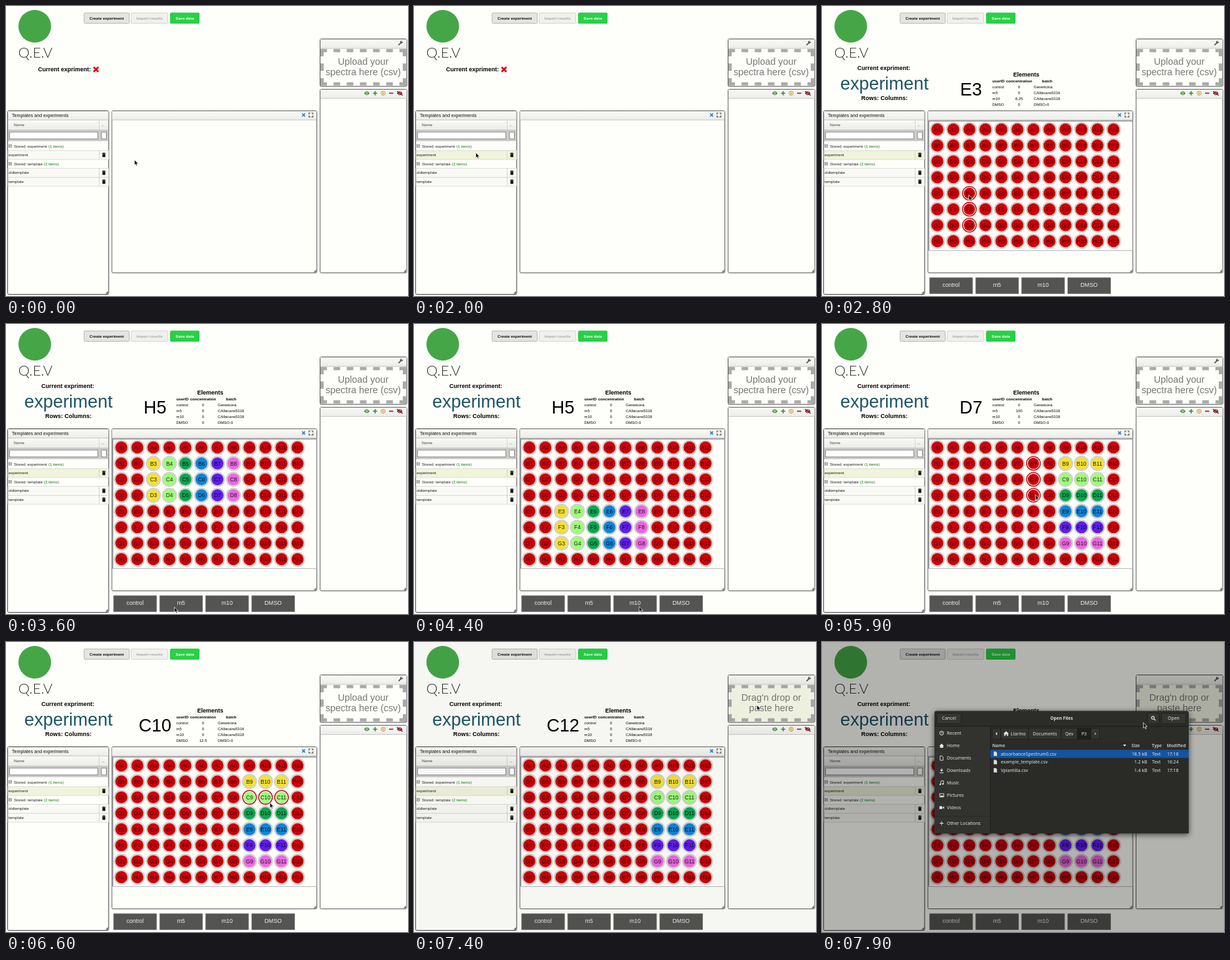
An HTML page that plays this animation: 615 px wide and 444 px high, repeating every 8000 ms.

```html
<!DOCTYPE html>
<html lang="en">
<head>
<meta charset="utf-8">
<title>Plate editor</title>
<style>
html, body { margin: 0; width: 100%; height: 100%; overflow: hidden; background: #fefefa; }
svg { display: block; width: 615px; height: 444px; font-family: "Liberation Sans", Arial, sans-serif; }
#dialog { font-family: "Noto Sans", sans-serif; filter: drop-shadow(0 2px 4px #000a); }
</style>
</head>
<body>
<svg id="stage" viewBox="0 0 615 444"></svg>
<script>
const LOOP = 8000, LOAD = 2300;
const RED = '#cc0008';
const LEVELS = ['#f5e132', '#9dff78', '#0aa650', '#0f84d8', '#5f1eec', '#ec66e2'];
const ELEMENTS = [['control', 'Geneticina'], ['m5', 'CAlbicans5316'], ['m10', 'CAlbicans5318'], ['DMSO', 'DMSO-0']];
const CLICKS = [[3400, 1], [4200, 2], [4800, 3]];
// Pointer path: time, x, y
const PATH = [
  [0, 197, 236], [1000, 197, 236], [1700, 95, 225], [2400, 95, 225], [2800, 225, 290],
  [3100, 274, 360], [3400, 258, 434], [3700, 258, 434], [4100, 334, 433], [4300, 334, 433],
  [4700, 403, 433], [5100, 403, 433], [5400, 378, 330], [5800, 327, 262], [6300, 327, 262],
  [6800, 446, 238], [6900, 470, 225], [7300, 525, 97], [7500, 525, 97], [7900, 492, 124]
];

const $ = id => document.getElementById(id);
const range = n => [...Array(n).keys()];
const clamp = v => Math.max(0, Math.min(1, v));
const show = (id, on) => $(id).setAttribute('display', on ? 'inline' : 'none');

const rect = (x, y, w, h, fill, more = '') =>
  `<rect x="${x}" y="${y}" width="${w}" height="${h}" fill="${fill}" ${more}/>`;
const text = (x, y, size, str, fill = '#222', more = '') =>
  `<text x="${x}" y="${y}" font-size="${size}" fill="${fill}" ${more}>${str}</text>`;
const path = (d, stroke, width = 1, fill = 'none', more = '') =>
  `<path d="${d}" stroke="${stroke}" stroke-width="${width}" fill="${fill}" ${more}/>`;
const circle = (x, y, r, fill, more = '') => `<circle cx="${x}" cy="${y}" r="${r}" fill="${fill}" ${more}/>`;
const group = (id, body, more = '') => `<g id="${id}" ${more}>${body}</g>`;
const BOLD = 'font-weight="bold"', MID = 'text-anchor="middle"', END = 'text-anchor="end"';

const wellX = c => 176.5 + 24.5 * c;
const wellY = r => 189 + 24.43 * r;
const wellName = (r, c) => 'ABCDEFGH'[r] + (c + 1);

// Returns the element and concentration level of a well, if it has any
function content(r, c) {
  if (c > 1 && c < 8 && r > 0 && r < 7) return { element: r < 4 ? 1 : 2, level: c - 2 };
  if (c > 7 && c < 11 && r > 0 && r < 7) return { element: 3, level: r - 1 };
  return null;
}

function panel(x, y, w, h, head, stroke = '#666') {
  const r = x + w, b = y + h;
  return rect(x + .3, y + .3, w, h, 'none', 'rx="2" stroke="#0001" stroke-width="2.4"') +
    rect(x, y, w, h, '#fefefa', `rx="2" stroke="${stroke}"`) +
    rect(x + .5, y + .5, w - 1, head - .5, 'url(#head)') +
    path(`M${x} ${y + head}H${r}`, '#bbb', .8) +
    path(`M${r - 1} ${b - 5}V${b - 1}H${r - 5}Z`, 'none', 0, '#666');
}

function eye(x, y, color) {
  return path(`M${x - 4} ${y}Q${x} ${y - 5} ${x + 4} ${y}Q${x} ${y + 5} ${x - 4} ${y}Z`, color, .6, color) +
    circle(x, y, 1.7, '#f4f4f0') + circle(x, y, .9, color);
}

function trash(y) {
  return path(`M147 ${y - 2.4}h5.4M148.6 ${y - 3}h2.2`, '#000', 1) + rect(147.5, y - 1.6, 4.4, 4.8, '#000', 'rx=".6"');
}

function topBar() {
  const button = (x, w, label, fill, edge, color) => rect(x, 10.7, w, 15.8, fill, `rx="1" stroke="${edge}"`) +
    text(x + w / 2, 21, 6, label, color, BOLD + MID);
  return circle(44, 31, 25, '#45a647') +
    text(45, 79, 22, 'Q.E.V', '#333', MID + ' font-family="Lato, sans-serif" font-weight="300"') +
    button(119.5, 69, 'Create experiment', '#e4e4e0', '#b8b8b4', '#111') +
    button(191.5, 56, 'Import results', '#f0f0ec', '#d4d4d0', '#aaa') +
    button(251.5, 44, 'Save data', '#28d146', '#28c844', '#fff');
}

function listPanel() {
  const row = (y, label) => rect(3, y, 154, 13.7, '#f9f9f5', `stroke="#d0d0cc" stroke-width=".7" id="row-${label}"`) +
    path(`M142.5 ${y}v13.7`, '#ccc', .8) + text(4, y + 8.8, 6, label) + trash(y + 6.8);
  const heading = (y, label, n) => rect(4.5, y - 4.5, 4, 4, '#fff', 'stroke="#777" stroke-width=".8"') +
    path(`M5.3 ${y - 2.5}h2.4`, '#333', .8) + text(12, y, 6, 'Stored: ' + label) +
    text(label === 'template' ? 58 : 65, y, 6, `(${n} items)`, '#088008');
  return panel(2.5, 160.5, 154.5, 281, 14, '#444') +
    text(9, 170, 7.1, 'Templates and experiments', '#111') +
    rect(3, 175, 154, 13.5, 'url(#head)') + text(12, 183.5, 6, 'Name', '#444') + text(145.5, 183.5, 6, '...', '#444') +
    path('M142.5 175v14', '#ccc', .8) +
    rect(3, 189, 154, 18, '#ccccc8') +
    rect(5.5, 193, 135, 10.5, '#fff', 'stroke="#888"') + rect(146, 193, 7.5, 10.5, '#fff', 'stroke="#888"') +
    path('M156.5 175V276', '#aaa', .8) +
    heading(216.7, 'experiment', 1) + row(221.3, 'experiment') +
    heading(244, 'template', 2) + row(248.6, 'oldtemplate') + row(262.3, 'template');
}

function uploadPanel() {
  const side = (d, dash) => path(d, '#aaaaa8', 5, 'none', `stroke-dasharray="${dash}"`);
  const lines = (a, b) => [a, b].map((s, i) => text(546.5, 89.8 + 16 * i, 14.4, s, '#777', MID)).join('');
  return panel(480.5, 50.5, 132.5, 72.5, 14.5, '#555') +
    path('M600.5 59.8L604.6 55.8', '#555', 1.8) + circle(605, 55.2, 2.1, '#555') + path('M605 55L608 52', '#f4f4f0', 1.4) +
    rect(481, 66, 131, 56, '#fefefa', 'id="drop"') +
    side('M481 68.2H612M481 119.2H612', 131 / 13) + side('M483.5 65.7V121.7M609.5 65.7V121.7', 11.2) +
    group('askUpload', lines('Upload your', 'spectra here (csv)')) +
    group('askDrop', lines("Drag'n drop or", 'paste here'));
}

function sidePanels() {
  return panel(162, 160.5, 313.5, 248, 14) +
    path('M453 164.5l4.6 4.6m0-4.6l-4.6 4.6', '#2f7ec4', 1.6) +
    path('M463.5 166v-2.3h2.2m1.6 0h2.2v2.3m0 1.6v2.3h-2.2m-1.6 0h-2.2v-2.3', '#555', 1.1) +
    panel(480.5, 127.5, 132.5, 281, 14) +
    eye(552, 133.5, '#3a8a2c') + path('M561.5 133.5h6.4m-3.2-3.2v6.4', '#3a8a2c', 1.7) +
    circle(577, 133.5, 3.2, 'none', 'stroke="#c9a227" stroke-width="1"') +
    circle(577, 133.5, 1.3, 'none', 'stroke="#c9a227" stroke-width="1"') +
    path('M586 133.5h6.5', '#a01020', 1.6) +
    eye(602.3, 133.5, '#7d0a18') + path('M598 130.2l8.8 6.8', '#7d0a18', 1.2);
}

function experimentView() {
  const info = text(94.5, 98.3, 9, 'Current expriment:', '#000', BOLD + MID) +
    text(95.5, 128, 27.3, 'experiment', '#1d5563', MID) +
    text(95.5, 144.3, 9, 'Rows: Columns:', '#000', BOLD + MID) +
    text(228, 136.5, 27.3, '', '#000', MID + ' id="label"') +
    text(312.5, 108, 9, 'Elements', '#000', BOLD + MID) +
    [[270, 'userID'], [301.5, 'concentration'], [344.5, 'batch']]
      .map(([x, s]) => text(x, 117.3, 6, s, '#000', BOLD + MID)).join('') +
    ELEMENTS.map(([name, batch], i) => {
      const y = 126.3 + 9 * i;
      return text(260.5, y, 6, name, '#000') + text(301.5, y, 6, '0', '#000', `${MID} id="conc${i}"`) +
        text(324, y, 6, batch, '#000');
    }).join('');
  const wells = range(96).map(i => {
    const r = i / 12 | 0, c = i % 12, x = wellX(c), y = wellY(r);
    return circle(x, y, 11.6, '#d2d2ce') +
      circle(x, y, 10.4, '#fff', `stroke="${RED}" stroke-width="1.3" id="ring${i}"`) +
      circle(x, y, 9.2, RED, `id="well${i}"`) +
      text(x, y + 3.2, 8.4, wellName(r, c), '#000', `${MID} id="name${i}"`);
  }).join('');
  const buttons = ELEMENTS.map(([name], i) => {
    const x = 164.8 + 70.4 * i;
    return rect(x, 416, 65.4, 24.3, '#545452', 'stroke="#6a6a68" stroke-width=".8"') +
      text(x + 32.7, 430, 8.8, name, '#eee', MID);
  }).join('');
  return info + rect(163, 176, 312, 198.5, '#fefefa', 'stroke="#bbb"') +
    path('M163.3 374V176H475', '#777', 1.2) + wells + buttons;
}

function fileDialog() {
  const light = '#e4e4e0', edge = 'stroke="#1c1c19" stroke-width=".8"';
  const say = (x, y, s, more = '') => text(x, y, 6.9, s, light, more);
  const button = (x, y, w, h, fill = '#353531') => rect(x, y, w, h, fill, `rx="2" ${edge}`);
  const icons = [
    circle(183, 139.5, 3, 'none', `stroke="${light}"`) + path('M183 137.5v2h1.6', light, .8),
    path('M179.5 159l3.5-3.4 3.5 3.4h-1v3h-5v-3Z', 'none', 0, light),
    path('M180.7 174.5h3l1.6 1.6v5h-4.6Z', light, .9),
    path('M183 193.5v4m-2-1.8l2 2 2-2M180 200.3h6', light, 1.1),
    path('M181.8 218v-5l4-.8v5', light, .9) + circle(180.9, 218, 1.2, light) + circle(184.9, 217.3, 1.2, light),
    rect(180, 232.2, 6.2, 5, 'none', `stroke="${light}" stroke-width=".9"`) + path('M180.5 237l2-2.6 1.4 1.4 1-1 1.2 2.2Z', 'none', 0, light),
    rect(179.6, 251.4, 4.4, 4.4, light) + path('M184.2 253.6l2.6-2v4Z', 'none', 0, light)
  ];
  const places = ['Recent', 'Home', 'Documents', 'Downloads', 'Music', 'Pictures', 'Videos']
    .map((s, i) => say(191, 142 + 19 * i, s) + icons[i]).join('');
  const crumbs = [[260, 13.5, ''], [273.5, 42.5, 'Ltarino'], [316, 50, 'Documents'], [366, 24.5, 'Qev'], [390.5, 21, 'P3'], [411.5, 13, '']]
    .map(([x, w, s]) => rect(x, 132, w, 17, s === 'P3' ? '#1f1f1c' : '#33332f', edge) +
      say(x + w / 2 + (s === 'Ltarino' ? 5.5 : 0), 142.6, s, MID)).join('');
  const files = [['absorbanceSpectrum0.csv', '18.5 kB', '17:18'], ['example_template.csv', '1.2 kB', '16:24'], ['Vplantilla.csv', '1.4 kB', '17:18']]
    .map(([name, size, time], i) => {
      const y = 173.8 + 12.6 * i;
      return path(`M262.7 ${y - 6}h3.2l1.8 1.8v5h-5Z`, 'none', 0, '#ddd') + say(273.5, y, name) +
        say(497.5, y, size, END) + say(505, y, 'Text') + say(545.5, y, time, END);
    }).join('');
  const columns = [[260.5, 'Name'], [473.5, 'Size'], [504.5, 'Type'], [527.5, 'Modified']]
    .map(([x, s]) => text(x, 161, 6.6, s, '#bcbcb8', BOLD)).join('');
  return rect(172, 105.5, 389, 187.5, '#2c2c29', 'rx="3"') +
    rect(172, 129, 85.5, 164, '#32322e') + rect(257.5, 152, 303.5, 141, '#2a2a27') +
    path('M172 129H561M257.5 129V293', '#1a1a17', .9) + path('M172 267H257', '#242421', .8) +
    button(175.5, 109, 37.5, 16) + say(194.3, 119.4, 'Cancel', MID) +
    text(366.5, 119.4, 6.7, 'Open Files', light, BOLD + MID) +
    button(498.5, 109, 17, 16) + circle(506.2, 116, 2.1, 'none', `stroke="${light}" stroke-width="1.1"`) +
    path('M507.8 117.6l2.4 2.4', light, 1.3) +
    button(519.5, 109, 37.5, 16) + say(538, 119.4, 'Open', MID) +
    places + path('M180 277.5h6m-3-3v6', light, 1) + say(191, 280, 'Other Locations') +
    crumbs + path('M268 138l-2.6 2.4 2.6 2.4Z', 'none', 0, light) + path('M417 138l2.6 2.4-2.6 2.4Z', 'none', 0, '#999') +
    path('M277.5 140.5l4.2-4 4.2 4h-1.2v3.2h-2v-2.2h-2v2.2h-2v-3.2Z', 'none', 0, light) +
    columns + path('M460.5 157h5l-2.5 3Z', 'none', 0, light) +
    rect(257.5, 165, 303.5, 12.5, '#15539e') + files;
}

$('stage').innerHTML =
  '<defs><linearGradient id="head" x2="0" y2="1"><stop stop-color="#f9f9f5"/><stop offset="1" stop-color="#ececea"/></linearGradient></defs>' +
  rect(0, 0, 615, 444, '#fefefa') + topBar() +
  group('empty', text(49, 100, 9, 'Current expriment:', '#000', BOLD) +
    path('M134 93.6l7.4 7.2m0-7.2l-7.4 7.2', '#d40f1c', 2.8)) +
  listPanel() + uploadPanel() + sidePanels() +
  group('loaded', experimentView()) +
  rect(0, 0, 615, 444, '#000', 'id="dim"') +
  group('dialog', fileDialog()) +
  group('pointer', path('M0 0V8.2L1.9 6.5 3.3 9.5 4.7 8.9 3.4 6H6Z', '#fff', .7, '#111'));

function pointerAt(t) {
  const i = PATH.findLastIndex(p => p[0] <= t), a = PATH[i], b = PATH[i + 1] || a;
  const u = clamp((t - a[0]) / (b[0] - a[0] || 1)), k = u * u * (3 - 2 * u);
  return [a[1] + (b[1] - a[1]) * k, a[2] + (b[2] - a[2]) * k];
}

function wellAt([x, y]) {
  const c = Math.round((x - 176.5) / 24.5), r = Math.round((y - 189) / 24.43);
  const inside = c >= 0 && c < 12 && r >= 0 && r < 8 && Math.hypot(x - wellX(c), y - wellY(r)) < 12;
  return inside ? { r, c } : null;
}

function lastWell(t) {
  for (let s = t; s >= LOAD; s -= 20) {
    const w = wellAt(pointerAt(s));
    if (w) return w;
  }
  return null;
}

function draw(t) {
  const pos = pointerAt(t), [x, y] = pos;
  const loaded = t >= LOAD, dropping = t >= 7200 && y < 130;
  $('pointer').setAttribute('transform', `translate(${x - .5} ${y - .5})`);
  show('empty', !loaded);
  show('loaded', loaded);

  for (const [name, top] of [['experiment', 221.3], ['oldtemplate', 248.6], ['template', 262.3]]) {
    const hot = x < 157 && y >= top && y < top + 13.7 || loaded && name === 'experiment';
    $('row-' + name).setAttribute('fill', hot ? '#f0f4da' : '#f9f9f5');
  }

  show('askUpload', !dropping);
  show('askDrop', dropping);
  $('drop').setAttribute('fill', dropping ? '#f5f8e6' : '#fefefa');

  const last = lastWell(t), lastHas = last && content(last.r, last.c);
  $('label').textContent = last ? wellName(last.r, last.c) : '';
  ELEMENTS.forEach((_, i) => {
    $('conc' + i).textContent = lastHas && lastHas.element === i ? 100 * 2 ** (lastHas.level - 4) : 0;
  });

  const click = CLICKS.findLast(c => c[0] <= t), active = click ? click[1] : -1;
  const over = t < 7200 && loaded ? wellAt(pos) : null, overHas = over && content(over.r, over.c);
  for (const i of range(96)) {
    const r = i / 12 | 0, c = i % 12, has = content(r, c);
    const lit = has && has.element === active;
    const ringed = over && (over.r === r && over.c === c ||
      has && overHas && has.element === overHas.element && has.level === overHas.level);
    show('ring' + i, ringed);
    $('well' + i).setAttribute('fill', lit ? LEVELS[has.level] : RED);
    $('well' + i).setAttribute('r', ringed ? 8.6 : 9.2);
    $('name' + i).setAttribute('fill-opacity', lit ? .85 : .68);
  }

  $('dim').setAttribute('opacity', .3 * clamp((t - 7350) / 500));
  show('dialog', t >= 7500);
}

function tick(now) {
  draw(Math.floor(now % LOOP / 100) * 100);
  requestAnimationFrame(tick);
}
draw(0);
requestAnimationFrame(tick);
</script>
</body>
</html>
```
